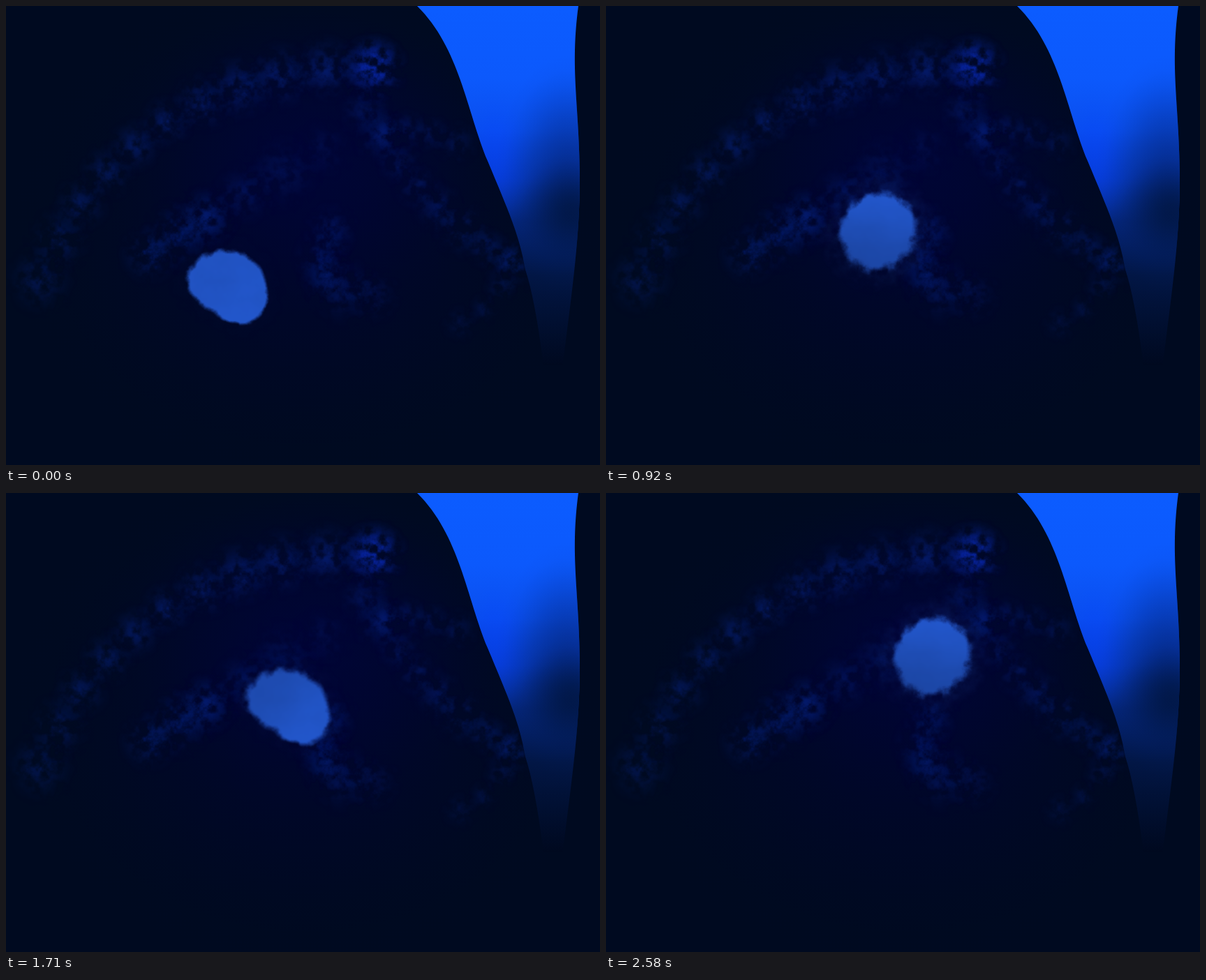
An HTML page with a canvas for the animation above (3870 ms loop, 851 by 658 pixels).

```html
<!DOCTYPE html>
<html lang="en">
<head>
<meta charset="utf-8">
<title>Drifting light</title>
<style>
  html, body { margin: 0; width: 100%; height: 100%; overflow: hidden; background: #000a20; }
  canvas { display: block; }
</style>
</head>
<body>
<canvas id="stage" width="851" height="658"></canvas>
<script>
const W = 851, H = 658, LOOP = 3870, CYCLE = 1460, SIZE = 220, MID = SIZE / 2;
const ctx = document.getElementById('stage').getContext('2d');

const mix = (a, b, k) => a + (b - a) * k;
const smooth = (lo, hi, v) => {
  const k = Math.min(1, Math.max(0, (v - lo) / (hi - lo)));
  return k * k * (3 - 2 * k);
};

// Fractal value noise
function hash(x, y) {
  let n = Math.imul(x, 374761393) ^ Math.imul(y, 668265263);
  n = Math.imul(n ^ (n >>> 13), 1274126177);
  return ((n ^ (n >>> 16)) >>> 0) / 4294967295;
}

function noise(x, y) {
  const i = Math.floor(x), j = Math.floor(y);
  const u = smooth(0, 1, x - i), v = smooth(0, 1, y - j);
  return mix(mix(hash(i, j), hash(i + 1, j), u), mix(hash(i, j + 1), hash(i + 1, j + 1), u), v);
}

function fbm(x, y) {
  let sum = 0, amp = 0.533;
  for (let o = 0; o < 4; o++, amp /= 2) {
    sum += amp * noise(x, y);
    x = x * 2 + 17;
    y = y * 2 + 31;
  }
  return sum;
}

function layer(w, h, shade) {
  const c = document.createElement('canvas');
  c.width = w;
  c.height = h;
  if (shade) {
    const g = c.getContext('2d'), img = g.createImageData(w, h);
    for (let p = 0; p < w * h; p++) {
      const [r, gr, b, a] = shade(p % w, Math.floor(p / w));
      img.data.set([r, gr, b, a * 255], p * 4);
    }
    g.putImageData(img, 0, 0);
  }
  return c;
}

function glow(g, x, y, rx, ry, rgb, alpha) {
  g.save();
  g.translate(x, y);
  g.scale(rx, ry);
  const fill = g.createRadialGradient(0, 0, 0, 0, 0, 1);
  for (let i = 0; i <= 8; i++) {
    fill.addColorStop(i / 8, `rgba(${rgb},${alpha * (1 - smooth(0, 1, i / 8))})`);
  }
  g.fillStyle = fill;
  g.fillRect(-1, -1, 2, 2);
  g.restore();
}

function puff(g, x, y, r, alpha, rgb = [6, 38, 145]) {
  const left = Math.round(x - r * 1.5), top = Math.round(y - r * 1.5), size = Math.ceil(r * 3);
  g.drawImage(layer(size, size, (px, py) => {
    const d = Math.hypot(px + left - x, py + top - y) / r;
    const fade = Math.exp(-2.2 * d * d) * (1 - smooth(1, 1.5, d));
    const grain = smooth(0.25, 0.8, fbm((px + left) / 11, (py + top) / 11));
    return [...rgb, fade * grain * alpha];
  }), left, top);
}

// Puffs along a quadratic curve, from alpha a0 to a1
function trail(g, [x0, y0], [cx, cy], [x1, y1], count, r, a0, a1) {
  for (let i = 0; i < count; i++) {
    const t = i / (count - 1), u = 1 - t;
    const x = u * u * x0 + 2 * u * t * cx + t * t * x1;
    const y = u * u * y0 + 2 * u * t * cy + t * t * y1;
    puff(g, x, y, r * mix(0.85, 1.15, hash(i, count)), mix(a0, a1, t));
  }
}

function beam(g) {
  g.save();
  g.clip(new Path2D('M589 0C650 60 660 150 690 222S736 330 744 378Q758 420 770 515H798C806 440 823 340 822 240S808 90 820 0Z'));
  const fill = g.createLinearGradient(0, 0, 0, 515);
  [[0, '#0c5cff'], [0.2, '#0c59fc'], [0.35, '#0a4fee'], [0.48, '#073cc4'], [0.6, '#042578'],
   [0.75, '#021644'], [1, '#00091f']].forEach(stop => fill.addColorStop(...stop));
  g.fillStyle = fill;
  g.fillRect(580, 0, 260, 516);
  glow(g, 700, 225, 62, 110, '6,62,255', 0.4);
  glow(g, 805, 250, 105, 180, '3,34,110', 0.65);
  glow(g, 810, 295, 85, 85, '1,20,58', 0.75);
  g.restore();
}

function backdrop() {
  const c = layer(W, H), g = c.getContext('2d');
  g.fillStyle = '#000a20';
  g.fillRect(0, 0, W, H);
  glow(g, 430, 320, 430, 360, '0,5,45', 0.85);
  glow(g, 440, 210, 300, 240, '0,4,60', 0.6);
  trail(g, [48, 392], [174, 92], [525, 85], 11, 38, 0.38, 0.6);
  trail(g, [205, 355], [300, 290], [455, 205], 6, 42, 0.55, 0.2);
  trail(g, [515, 150], [590, 290], [725, 368], 8, 32, 0.35, 0.42);
  trail(g, [545, 180], [590, 170], [645, 196], 4, 26, 0.4, 0.3);
  trail(g, [465, 322], [420, 410], [525, 415], 5, 38, 0.42, 0.32);
  trail(g, [722, 365], [710, 430], [650, 455], 4, 22, 0.35, 0.22);
  puff(g, 527, 88, 40, 0.7, [10, 48, 225]);
  puff(g, 280, 308, 40, 0.4);
  beam(g);
  return c;
}

// hop leads to the same pose one cycle later; stretch and pear bend the outline
const REST = { x: 319, y: 400, hopX: 78, hopY: -88, r: 55, stretch: 0.116, pear: 0.057, soft: 4, dim: 0.96, lit: 0.7, halo: 0.02 };
const LEAN = { x: 334, y: 377, hopX: 80, hopY: -84, r: 59, stretch: 0.166, pear: 0.068, soft: 8, dim: 0.78, lit: 0.85, halo: 0.06 };
const RISE = { x: 389, y: 323, hopX: 78, hopY: -89, r: 57, stretch: -0.04, pear: 0, soft: 7, dim: 0.82, lit: -1.4, halo: 0.16 };
const HANG = { x: 389, y: 313, hopX: 94, hopY: -113, r: 57, stretch: -0.01, pear: 0, soft: 7, dim: 0.88, lit: 1.5, halo: 0.16 };

function blend(a, b, k) {
  return Object.fromEntries(Object.keys(a).map(key => [key, mix(a[key], b[key], k)]));
}

function orb(p) {
  const lx = Math.cos(p.lit), ly = Math.sin(p.lit);
  p.image = layer(SIZE, SIZE, (px, py) => {
    const x = px - MID, y = py - MID, d = Math.hypot(x, y), a = Math.atan2(y, x);
    if (d > 100) return [0, 0, 0, 0];
    const outline = p.r * (1 + p.stretch * Math.cos(2 * (a - 0.58)) + p.pear * Math.cos(3 * (a - 1.1)));
    const grain = fbm(px / 12, py / 12);
    const facing = smooth(-55, 55, x * lx + y * ly);
    const soft = p.soft * mix(1.3, 0.8, facing);
    const edge = outline - d + (grain - 0.5) * soft * 2;
    const body = smooth(-0.6 * soft, 1.5 * soft, edge);
    const mist = p.halo * smooth(-34, 6, edge) * smooth(0, 0.8, grain);
    const light = mix(p.dim, 1, facing) * (0.96 + 0.06 * fbm(px / 26 + 9, py / 26));
    return [34 * light, 86 * light, 202 * light, body + (1 - body) * mist];
  });
  return p;
}

const poses = [
  ...[0, 0.25, 0.5, 0.75].map(k => blend(REST, LEAN, k)),
  LEAN, blend(LEAN, RISE, 0.5), RISE, HANG
].map(orb);
const starts = [0, 125, 250, 375, 500, 670, 920, 1130];
const scene = backdrop();

function tick() {
  const t = performance.now() % LOOP;
  const hop = t < CYCLE ? 0 : 1;
  const p = poses[starts.filter(s => s <= t - hop * CYCLE).length - 1];
  ctx.drawImage(scene, 0, 0);
  ctx.drawImage(p.image, p.x + p.hopX * hop - MID, p.y + p.hopY * hop - MID);
  requestAnimationFrame(tick);
}
tick();
</script>
</body>
</html>
```
